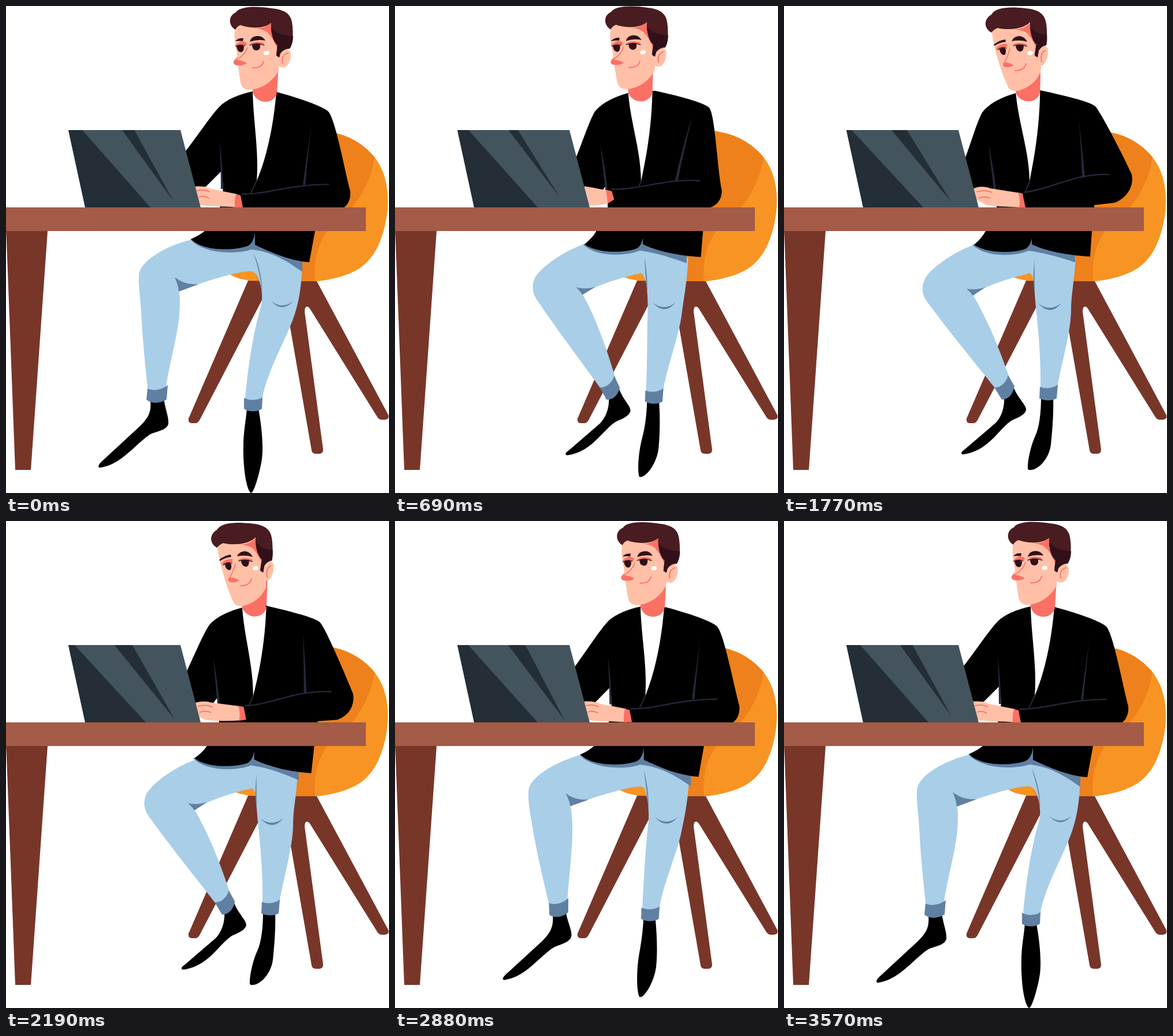
Write an HTML page that moves like this. It is 663 px wide and 844 px high and loops after 3.6 s.

```html
<!DOCTYPE html>
<html lang="en">
<head>
<meta charset="utf-8">
<title>Man at a desk</title>
<style>
  html, body { margin: 0; height: 100%; overflow: hidden; background: #fff; }
  svg { display: block; width: 100%; height: 100%; }
</style>
</head>
<body>
<svg id="stage" viewBox="0 0 663 844" preserveAspectRatio="none"></svg>
<script>
const LOOP = 3600, STEP = 30;
const BLACK = '#000', SEAM = '#252a3d', SKIN = '#ffc0a7', CORAL = '#fb7064', HAIR = '#481c20',
  DARK = '#31101a', JEANS = '#a9cee8', DENIM = '#6080a3', WOOD = '#783629', ORANGE = '#f79423',
  AMBER = '#ee811b', SLATE = '#43545e', INK = '#232e36';

// Smooth monotone curve through [time, value] keys
function curve(...keys) {
  const slope = i => (keys[i + 1][1] - keys[i][1]) / (keys[i + 1][0] - keys[i][0]);
  const tangent = i => {
    if (i === 0 || i === keys.length - 1) return 0;
    const a = slope(i - 1), b = slope(i);
    return a * b > 0 ? 2 * a * b / (a + b) : 0;
  };
  return t => {
    let i = 0;
    while (i < keys.length - 2 && t > keys[i + 1][0]) i++;
    const [t0, v0] = keys[i], [t1, v1] = keys[i + 1], h = t1 - t0;
    const s = (t - t0) / h, r = 1 - s;
    return v0 * (1 + 2 * s) * r * r + v1 * s * s * (3 - 2 * s)
      + h * s * r * (tangent(i) * r - tangent(i + 1) * s);
  };
}

const lean = curve([0, 0], [420, .5], [840, 1], [1680, 1], [2490, .42], [2880, .08], [3150, 0], [3600, 0]);
const farLeg = curve([0, 0], [420, 1], [820, 2], [2100, 2], [2490, 1.4], [2880, .33], [3250, 0], [3600, 0]);
const nearLeg = curve([0, 0], [180, 0], [420, .18], [555, .45], [960, 1], [2230, 1], [2490, .94],
  [2700, .72], [2880, .47], [3225, .075], [3520, 0], [3600, 0]);
const reach = curve([0, 0], [420, 1], [1000, 2], [1200, 2], [1720, 3], [1800, 3], [2490, 4],
  [2880, 4.95], [3150, 5], [3600, 5]);
const face = curve([0, 0], [420, 0], [1140, .6], [1700, 1], [1900, 1], [2490, .9], [2880, .05], [3050, 0], [3600, 0]);
const headX = curve([0, 0], [420, -12.5], [1140, -38], [1770, -39], [2490, -24], [2880, -3.5], [3200, 0], [3600, 0]);
const headY = curve([0, 0], [420, -2], [1140, 1], [1770, 1], [2490, 1.5], [2880, .5], [3200, 0], [3600, 0]);

const stage = document.getElementById('stage');
const movers = [];
let parent = stage;

function add(tag, attrs) {
  const el = document.createElementNS('http://www.w3.org/2000/svg', tag);
  for (const k in attrs) el.setAttribute(k, attrs[k]);
  return parent.appendChild(el);
}
const fixed = (fill, d) => add('path', { fill, d });

const NUM = /-?\d+(?:\.\d+)?/g;
// Path that blends through its poses; the last pose leads back to the first
function morph(track, paint, ...poses) {
  const el = add('path', paint);
  const sets = poses.map(p => p.match(NUM).map(Number));
  movers.push(t => {
    const p = track(t), i = Math.floor(p), f = p - i;
    const a = sets[i % sets.length], b = sets[(i + 1) % sets.length];
    let n = 0;
    el.setAttribute('d', poses[0].replace(NUM, () => {
      const v = a[n] + (b[n] - a[n]) * f;
      n++;
      return v.toFixed(2);
    }));
  });
}
const fill = (track, color, ...poses) => morph(track, { fill: color }, ...poses);
const line = (track, color, width, ...poses) =>
  morph(track, { fill: 'none', stroke: color, 'stroke-width': width, 'stroke-linecap': 'round' }, ...poses);

// Chair
fixed(ORANGE, 'M480,214 C515,211 545,213 570,220 C600,227 622,243 638,262 C655,284 661,310 661,338 C661,375 648,418 630,438 C620,450 610,457 598,462 C555,482 485,482 430,477 C410,475 396,471 386,464 Z');
fixed(AMBER, 'M480,214 C515,211 545,213 570,220 C600,227 622,243 638,262 C633,297 615,331 598,350 C580,366 568,376 556,390 C538,415 532,446 535,479 C500,480 465,479 436,477 L424,440 Z');
fixed(WOOD, 'M419,476 L316,715 Q315,723 322,723 H329 Q333,722 336,716 L460,477 Z');
fixed(WOOD, 'M478,477 L529,770 Q530,776 537,776 H543 Q549,775 549,769 L517,530 Q517,521 521,521 Q524,521 527,526 L642,711 Q645,717 651,717 H656 Q664,716 662,709 L538,477 Z');

// Far leg
fill(farLeg, BLACK,
  'M273,680 C276,700 282,712 281,724 C279,735 262,737 250,742 C225,758 200,795 163,800 C158,800 160,795 165,790 L232,728 C245,715 252,705 250,685 Z',
  'M342,670 C345,690 356,700 355,709 C353,721 339,726 326,732 C300,748 280,780 244,786 C239,786 240,783 245,779 L302,727 C314,715 322,700 320,680 Z',
  'M398,662 C405,680 420,692 419,700 C417,710 402,714 393,719 C370,735 355,770 311,777 C305,777 307,772 311,770 L367,722 C378,710 382,692 381,679 Z');
fill(farLeg, JEANS,
  'M321,405 C290,412 245,432 232,458 C227,470 232,500 234,530 C237,590 243,640 246,670 L276,666 C284,610 302,560 301,510 C301,502 300,498 299,494 L333,482 C370,470 410,458 426,460 Q434,463 440,475 L440,400 Z',
  'M323,406 C292,416 248,440 236,460 C229,473 234,490 241,503 C265,560 292,620 313,670 L343,655 C338,590 328,530 315,497 C314,495 313,494 313,493 L338,484 C373,472 410,463 428,461 Q434,464 438,475 L440,402 Z',
  'M329,414 C295,425 250,457 243,475 C236,492 241,505 251,517 C290,570 340,630 370,668 L392,650 C372,590 350,540 330,506 C329,504 328,502 327,501 L347,489 C375,476 410,467 426,463 Q430,466 432,475 L440,405 Z');
fill(farLeg, DENIM,
  'M292,470 C305,480 318,483 334,482 L299,495 Q298,483 292,470 Z',
  'M302,476 C314,484 325,485 339,484 L313,493 Q309,485 302,476 Z',
  'M316,490 C327,492 340,491 349,487 L327,502 Q322,495 316,490 Z');
fill(farLeg, DENIM,
  'M245,663 C255,668 270,665 280,657 L278,682 C265,690 250,689 243,682 Z',
  'M310,660 C322,663 336,657 341,646 L344,671 C338,683 322,687 316,683 Z',
  'M364,661 C375,662 385,652 388,640 L399,659 C396,675 387,682 377,682 Z');

// Near leg
fill(nearLeg, BLACK,
  'M417,698 L437,698 C442,725 446,760 443,785 C440,805 432,835 426,843 Q424,845 422,842 C414,830 410,790 411,760 C411,740 415,720 417,698 Z',
  'M445,678 L466,678 C467,710 464,740 462,760 C459,785 440,804 427,804 Q421,805 422,799 C422,785 428,760 435,745 C442,730 445,705 445,678 Z');
fill(nearLeg, JEANS,
  'M425,410 L513,440 C512,490 506,518 496,545 C483,580 449,640 443,684 L414,682 C418,630 429,560 441,522 C446,505 442,480 434,466 Z',
  'M425,415 L505,435 C503,475 497,500 497,525 C497,565 480,620 473,662 L444,664 C445,610 440,560 436,522 C434,500 433,480 430,464 Z');
fill(nearLeg, DENIM,
  'M429,428 C433,445 443,470 443,504 C445,475 438,450 429,428 Z',
  'M434,438 C432,455 430,475 434,494 C434,475 433,455 434,438 Z');
fill(nearLeg, DENIM,
  'M459,511 Q478,527 498,511 Q478,533 459,511 Z',
  'M440,515 Q460,531 480,515 Q461,539 440,515 Z');
fill(nearLeg, DENIM,
  'M412,679 C420,684 436,684 444,678 L443,698 C435,704 420,704 412,698 Z',
  'M443,660 C452,664 465,663 474,656 L472,680 C463,685 450,684 442,680 Z');

// Jacket and shirt
fill(lean, DENIM,
  'M319,404 C340,430 400,431 424,422 C460,425 490,444 513,461 L513,435 L432,388 L410,408 Z',
  'M326,414 C350,437 400,434 424,424 C450,428 480,436 504,444 L504,428 L430,398 L410,410 Z');
fill(lean, BLACK,
  'M427,148 L468,149 L550,200 L545,349 L535,390 L525,444 C490,442 455,425 431,414 L431,391 Q429,411 418,416 C395,424 342,426 320,404 Q338,396 346,388 L370,349 L376,316 C374,290 371,260 371,230 Z',
  'M401,151 L443,146 L530,200 L537,349 L533,390 L530,434 C490,432 450,424 429,413 L429,403 Q426,417 418,421 C395,429 350,429 329,414 Q343,402 349,390 L368,349 L367,325 C364,300 358,270 355,240 Z');
fill(lean, BLACK,
  'M427,148 C404,153 381,162 369,175 C353,192 328,230 309,254 L328,316 L346,313 L373,286 L400,200 Z',
  'M401,151 C379,157 353,169 342,186 C332,206 323,240 312,268 L328,317 L358,326 L366,310 L380,200 Z');
fill(lean, '#fff',
  'M427,148 C428,200 438,250 434,303 C448,270 462,220 468,149 Z',
  'M401,151 C405,200 424,250 425,304 C431,270 442,220 443,146 Z');
fill(lean, CORAL,
  'M426,128 L472,100 L469,150 C465,171 434,172 427,149 Z',
  'M401,130 L444,100 L443,148 C440,170 410,171 401,151 Z');
fill(lean, SEAM,
  'M370,234 C371,262 372,290 372,317 L376,317 C375,290 373,260 370,234 Z',
  'M354,240 C357,270 361,300 364,326 L368,326 C365,300 360,270 354,240 Z');
line(lean, SEAM, 2, 'M434,303 L424,324', 'M425,304 L418,321');

// Typing hand and front sleeve
fill(reach, SKIN,
  'M320,314 C335,311 347,313 355,317 L400,326 L400,349 C375,347 350,347 336,345 L320,335 Z',
  'M320,306 C335,306 345,306 355,307 L374,308 L379,332 C365,337 350,340 336,340 L320,340 Z',
  'M320,315 C335,318 345,321 350,323 L363,327 L363,349 C355,350 345,350 338,350 L320,350 Z',
  'M322,319 C335,312 347,312 357,316 L408,324 L409,349 C385,348 365,347 350,345 L322,330 Z',
  'M320,315 C335,311 347,312 355,313 L401,317 L401,341 C380,347 350,345 336,343 L320,335 Z');
line(reach, CORAL, 1.8,
  'M331,320 Q343,317 352,322 M335,331 Q343,328 351,333',
  'M308,312 Q316,310 322,313 M308,325 Q316,322 322,327',
  'M298,320 Q308,317 314,322 M302,331 Q310,328 316,333',
  'M334,322 Q348,318 360,323 M337,333 Q347,329 357,333',
  'M331,320 Q343,316 353,321 M335,329 Q343,326 351,330');
fill(reach, BLACK,
  'M468,149 C510,160 547,174 557,182 C570,193 586,285 596,321 C597,335 592,345 584,350 L540,351 L410,350 L405,326 L440,322 L500,200 Z',
  'M455,147 C500,156 538,168 548,175 C560,186 566,285 574,320 C575,334 570,344 558,349 L540,350 L386,331 L372,306 L430,304 L490,200 Z',
  'M443,146 C490,156 530,167 540,176 C551,186 552,280 560,318 C561,332 552,346 536,350 L520,350 L374,349 L367,326 L420,318 L480,200 Z',
  'M443,146 C490,156 530,166 539,174 C550,187 585,255 602,292 C606,312 594,333 572,341 L537,345 L418,350 L412,324 L440,320 L480,200 Z',
  'M457,147 C502,158 540,170 550,178 C561,190 587,275 599,309 C602,328 594,344 576,349 L539,350 L413,339 L409,318 L440,318 L490,200 Z');
fill(reach, CORAL,
  'M398,326 L406,328 L410,349 L396,349 Q395,337 398,326 Z',
  'M372,307 L383,310 L388,322 L379,332 Q372,318 372,307 Z',
  'M360,326 L370,328 L374,344 L361,349 Q364,338 360,326 Z',
  'M405,323 L413,325 L418,349 L407,349 Q410,336 405,323 Z',
  'M398,317 L409,318 L413,338 L399,342 Q401,328 398,317 Z');
line(reach, SEAM, 2.2,
  'M408,326 C450,327 485,310 558,309',
  'M380,306 C425,311 470,296 537,304',
  'M371,325 C420,325 465,300 521,302',
  'M416,323 C465,317 500,290 563,292',
  'M412,317 C455,319 495,298 562,301');
fill(reach, SEAM,
  'M529,204 C524,245 521,280 518,310 L514,310 C518,280 523,245 529,204 Z',
  'M518,196 C511,235 504,270 498,302 L493,303 C500,270 508,235 518,196 Z',
  'M512,189 C501,230 491,270 484,302 L479,304 C487,270 497,230 512,189 Z',
  'M510,192 C514,230 518,265 521,297 L516,298 C515,265 513,230 510,192 Z',
  'M520,197 C521,235 521,270 519,301 L515,302 C516,270 518,235 520,197 Z');

// Head
const head = parent = add('g', {});
movers.push(t => head.setAttribute('transform', `translate(${headX(t)} ${headY(t)})`));
fill(face, SKIN,
  'M473,80 Q488,68 493,82 Q494,98 484,106 Q476,108 470,102 Z',
  'M478,75 Q492,62 496,74 Q497,92 488,101 Q482,104 476,98 Z');
line(face, CORAL, 1.8, 'M479,99 Q476,85 488,81', 'M485,96 Q482,81 491,76');
fill(face, SKIN,
  'M399,30 C394,45 395,62 399,78 C401,95 403,115 406,133 C408,142 414,146 424,145 C445,143 462,130 472,112 L475,60 L462,28 Z',
  'M399,36 C398,48 402,66 407,83 C411,98 417,118 425,135 C428,144 433,147 443,146 C462,142 476,130 483,114 L482,60 L466,28 Z');
fill(face, SKIN,
  'M413,70 L396,92 Q391,101 400,103 L417,100 L422,75 Z',
  'M426,72 L419,95 Q415,102 424,105 L437,102 L434,75 Z');
fill(face, CORAL,
  'M396,93 Q406,93 417,99 Q408,105 397,102 Q391,99 396,93 Z',
  'M419,97 Q428,96 437,102 Q428,107 420,104 Q416,101 419,97 Z');
line(face, CORAL, 1.6, 'M418,72 C415,81 407,90 398,93', 'M430,73 C428,82 424,90 421,97');
fill(face, CORAL,
  'M397,68 Q408,57 417,64 L415,70 Q406,66 397,71 Z M421,67 Q430,59 446,64 L447,68 Q432,65 421,67 Z',
  'M406,72 Q414,63 426,65 L424,70 Q415,70 407,75 Z M434,67 Q443,60 459,65 L460,69 Q446,65 434,67 Z');
fill(face, DARK,
  'M399,69 Q407,66 412,70 Q412,80 406,80 Q400,79 399,69 Z M426,67 Q433,63 440,66 Q441,77 434,77 Q426,77 426,67 Z',
  'M412,74 Q420,69 423,74 Q424,84 419,84 Q413,82 412,74 Z M440,68 Q447,64 454,67 Q454,78 448,78 Q441,77 440,68 Z');
line(face, DARK, 1.3,
  'M398,70 Q406,66 413,69 M422,68 Q435,63 447,68',
  'M409,75 Q416,69 424,72 M436,68 Q448,64 459,69');
fill(face, DARK,
  'M397,61 Q402,55 411,56 L410,61 Q403,60 397,61 Z M422,62 Q424,53 434,52 Q444,51 449,60 Q436,57 422,62 Z',
  'M402,66 Q412,58 422,57 L423,61 Q413,62 403,68 Z M433,60 Q436,52 446,51 Q456,52 460,61 Q447,57 433,60 Z');
line(face, CORAL, 1.8, 'M427,107 Q443,108 446,96', 'M439,111 Q455,111 458,99');
fill(face, '#fff',
  'M446,82 C446,77 456,76 456,81 C456,86 446,87 446,82 Z',
  'M460,81 C460,76 470,75 470,80 C470,85 460,86 460,81 Z');
fill(face, CORAL,
  'M428,39 Q449,40 460,28 C458,45 463,62 472,68 L469,72 Q459,50 450,44 Q442,39 428,39 Z',
  'M435,40 Q455,40 466,27 C464,43 469,60 478,65 L475,70 Q465,49 457,44 Q449,40 435,40 Z');
fill(face, HAIR,
  'M397,41 C385,34 384,17 398,11 C405,0 435,0 460,4 C482,6 493,14 495,28 C498,45 497,65 491,74 Q482,73 475,82 L473,89 L468,86 Q469,75 470,68 C462,62 458,45 459,29 C445,42 415,37 406,33 Q400,35 397,41 Z',
  'M398,45 C385,38 384,22 398,14 C405,1 430,0 457,3 C480,5 491,13 493,30 C495,45 494,60 493,67 Q485,68 480,76 L478,88 L473,85 Q474,73 476,66 C468,58 464,42 465,27 C450,42 420,40 409,37 Q403,39 398,45 Z');
fill(face, DARK,
  'M459,38 C470,48 485,53 497,52 C497,62 494,70 491,74 Q482,73 475,82 L473,89 L468,86 Q469,75 470,68 C463,60 460,50 459,38 Z',
  'M465,36 C475,46 485,49 494,48 C495,57 494,63 493,67 Q485,68 480,76 L478,88 L473,85 Q474,73 476,66 C469,58 466,48 465,36 Z');
parent = stage;

// Desk and laptop
fixed('#a45b47', 'M0,349 H623 V390 H0 Z');
fixed(WOOD, 'M0,390 H72 L43,804 H16 L1,408 Z');
fixed(SLATE, 'M108,215 H302 L337,349 H137 Z');
const shade = fixed(INK, ''), glint = fixed(INK, '');
movers.push(t => {
  const a = t / LOOP * 2 * Math.PI, c = Math.cos(a), s = Math.sin(a);
  shade.setAttribute('d', `M108,215 H${124.5 + 7.5 * c} L${245.5 + 4.5 * c},349 H137 Z`);
  glint.setAttribute('d', `M${193.5 + 7.5 * c},215 H${217.7 + 4.5 * c - 7 * s} L${289 - 4.5 * s},${338 - c - 7.5 * s} Z`);
});

function draw() {
  const now = performance.now() % LOOP, t = now - now % STEP;
  for (const move of movers) move(t);
  requestAnimationFrame(draw);
}
draw();
</script>
</body>
</html>
```
